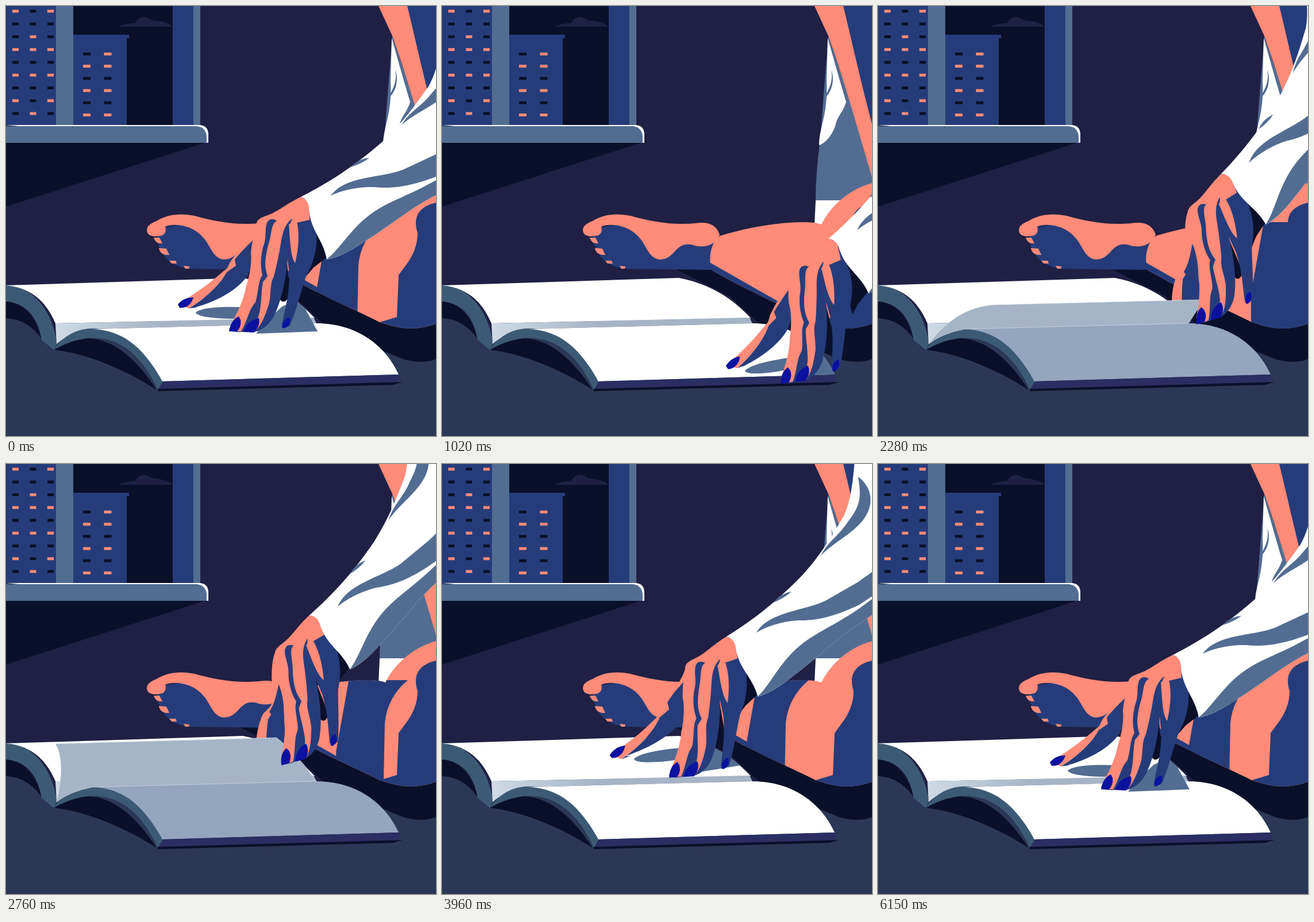
Recreate the animation shown at these times as an HTML page. Size 748 by 748 pixels, loop 6.18 s.

```html
<!DOCTYPE html>
<html lang="en">
<head>
<meta charset="utf-8">
<title>Turning a page</title>
<style>
html, body { margin: 0; height: 100%; overflow: hidden; background: #202044; }
svg { display: block; width: 100%; height: 100%; }
.wall { fill: #202044 } .dark { fill: #0a1029 } .navy { fill: #263c7a }
.slate { fill: #536d92 } .skin { fill: #ff8b78 } .white { fill: #fff }
.nail { fill: #0b12a0 } .cover { fill: #3d5a74 } .floor { fill: #2b3855 }
</style>
</head>
<body>
<svg viewBox="0 0 748 748">
  <defs>
    <path id="legShape" d="M483,400 C530,386 580,376 630,376 Q650,376 660,380 C675,350 705,320 748,308 V553 C715,564 690,564 650,550 C600,525 540,500 470,460 C460,448 462,430 466,420 Q474,408 483,400Z"/>
    <path id="backPage" d="M0,486 L412,473 C465,483 505,508 537,543 L86,552 C70,515 45,490 0,486Z"/>
    <path id="frontPage" d="M150,562 L540,552 C610,552 660,590 683,641 L272,653 C240,595 205,564 150,562Z"/>
    <path id="gutter" d="M86,552 L535,542 540,552 150,562 Q110,568 88,588Z"/>
    <clipPath id="onLeg"><use href="#legShape"/></clipPath>
    <clipPath id="onBook"><use href="#backPage"/><use href="#frontPage"/><use href="#gutter"/></clipPath>
    <linearGradient id="fold"><stop stop-color="#cfdae5"/><stop offset=".4" stop-color="#a5b5c7"/></linearGradient>
  </defs>

  <rect class="wall" width="748" height="748"/>

  <g id="window">
    <path class="dark" d="M0,0 H338 V208 H0Z M0,237 H349 L0,349Z"/>
    <path class="wall" d="M194,36 Q212,29 225,30 C230,15 246,18 254,25 Q278,26 290,36Z"/>
    <path class="navy" d="M0,0 H87 V208 H0Z M117,50 H214 V56 H210 V208 H117Z M290,0 H326 V208 H290Z"/>
    <path class="slate" d="M87,0 H117 V208 H87Z M326,0 H338 V208 H326Z"/>
    <path class="white" d="M0,207 H335 Q351,207 352,222 V238 H340Z"/>
    <path class="slate" d="M0,209 H331 Q347,210 349,226 V238 H0Z"/>
  </g>

  <path class="floor" d="M0,541 Q30,543 60,575 L748,560 V748 H0Z"/>
  <path class="dark" d="M405,457 L470,458 C560,500 650,560 748,553 V614 Q725,624 690,614 L560,560 500,505Z"/>

  <g id="torso">
    <path class="slate" d="M672,52 L748,280 V340 H650 C650,290 656,250 658,230Z"/>
    <path class="white" d="M671,56 C682,95 692,130 703,167 C696,188 690,188 685,205 C680,225 665,240 656,242 C656,210 672,190 669,130Z M650,338 H748 L690,380 H648Z"/>
    <path class="slate" d="M677,112 C682,135 668,150 666,160 C680,148 683,125 677,112Z"/>
    <path class="navy" d="M696,0 H748 V210Z"/>
    <path class="skin" d="M648,0 H698 C715,70 728,130 748,205 V298 C728,230 700,130 672,52Z"/>
  </g>

  <use href="#legShape" class="skin"/>
  <g clip-path="url(#onLeg)">
    <path class="navy" d="M748,342 C715,350 708,370 716,395 Q716,425 694,453 L683,468 680,541 650,550 700,580 H748Z M455,440 L585,514 575,530 455,470Z"/>
    <path id="armShade" class="navy"/>
  </g>

  <g id="foot">
    <path class="navy" d="M276,385 L262,402 Q266,425 277,437 Q290,452 315,457 L470,459 Q460,435 476,405 L400,385 330,376Z"/>
    <path class="skin" d="M245,390 Q245,380 262,374 C280,362 305,360 328,365 C360,374 400,382 440,378 Q475,372 483,398 C475,415 460,421 440,417 C405,405 408,442 378,441 C360,438 357,420 345,405 Q328,384 300,381 Q285,380 277,384 Q280,394 272,399 Q246,405 245,390Z"/>
    <path class="skin" d="M257,403 L267,403 272,413 Q260,414 257,403Z M266,421 L279,422 284,433 Q268,434 266,421Z M284,443 L295,443 297,448 H288Z M309,452 L319,453 318,457 H312Z"/>
  </g>

  <g id="under"></g>

  <g id="book">
    <path class="dark" d="M0,510 Q50,525 62,580 Q40,545 0,543Z M84,598 C120,570 190,555 262,668 C220,640 150,606 84,598Z"/>
    <path class="cover" d="M0,485 C50,486 85,540 88,588 L83,598 62,581 C55,540 35,517 0,514Z"/>
    <use href="#backPage" class="white"/>
    <use href="#gutter" fill="url(#fold)"/>
    <path class="cover" d="M83,598 Q110,558 160,561 C210,566 245,600 273,653 L264,668 C225,580 160,555 83,598Z"/>
    <use href="#frontPage" id="front"/>
    <path fill="#2a2e62" d="M273,653 L683,641 686,650 676,657 264,668Z"/>
    <path class="dark" d="M264,666 L690,654 674,659 264,670Z"/>
  </g>
  <path id="page" stroke="#dbe3ea" stroke-width=".7"/>

  <g clip-path="url(#onBook)"><g id="shade">
    <path id="indexShade" class="slate" d="M330,533 C345,521 400,523 440,525 L420,543 C380,546 332,542 330,533Z"/>
    <path class="slate" d="M435,570 Q455,545 480,523 Q505,510 518,522 L542,566Z"/>
  </g></g>

  <g class="arm">
    <path class="dark" d="M520,345 H530 L552,400 557,438 535,455 522,470Z"/>
  </g>
  <g id="over"></g>
  <g class="hand">
    <path class="dark" d="M488,430 L475,508 Q483,522 493,505Z"/>
    <path class="navy" d="M437,377 C432,400 428,430 432,450 C426,480 420,510 410,535 L388,562 Q390,568 410,567 H432 C448,564 462,550 468,535 C480,510 488,470 490,440 L493,470 C492,510 484,530 480,555 Q485,562 494,556 C505,530 515,490 522,470 C536,445 542,420 540,395 L528,340 513,332Z"/>
    <path class="skin" d="M513,332 C490,343 480,352 468,358 C455,366 440,366 436,377 L440,392 458,372 Q464,369 470,373 L478,374 498,370 492,384 506,377 528,372 527,340Z"/>
    <path class="skin" d="M436,377 L456,372 C448,390 455,400 447,420 C442,440 443,455 446,468 C438,480 440,495 434,515 L427,525 C420,540 416,555 409,566 H400 L409,545 390,556 C402,535 414,510 417,490 C424,470 428,445 426,430 C428,405 434,390 436,377Z"/>
    <path class="skin" d="M466,378 C475,368 485,368 497,370 C480,385 480,405 476,425 C472,445 470,455 466,470 C458,485 462,500 457,520 C450,540 445,555 432,567 L437,545 C445,530 443,500 447,480 L455,470 C448,450 452,435 455,420 C462,400 460,390 466,378Z"/>
    <path class="skin" d="M492,380 L505,372 C512,395 508,425 503,447 C494,435 494,400 492,380Z"/>
    <path class="nail" d="M388,566 Q391,546 405,540 Q413,553 402,566Z M413,567 Q420,546 440,543 Q443,557 431,568Z M480,559 Q482,543 494,542 Q496,557 483,561Z"/>
  </g>
  <g class="arm">
    <path class="white" d="M513,332 C560,308 605,280 656,235 C690,203 710,175 735,140 C752,110 757,70 765,30 L785,-160 1000,-160 960,200 748,329 C705,350 665,385 620,412 Q585,436 558,441 C552,405 528,390 527,350 Q525,336 513,332Z"/>
    <path class="slate" d="M557,441 C580,425 600,385 640,358 C670,338 700,330 748,303 L960,175 V200 L748,329 C705,350 665,385 620,412 Q585,436 557,441Z"/>
    <path class="slate" d="M565,330 C590,295 650,300 690,285 L748,258 900,170 V215 L748,297 C700,315 670,318 640,315 C610,314 580,322 565,330Z"/>
    <path class="slate" d="M600,280 Q612,266 632,264 Q620,274 600,280Z M688,207 C705,180 720,178 742,150 C765,125 768,110 765,75 C788,95 790,125 768,150 C745,175 712,185 688,207Z"/>
  </g>

  <g id="index" class="hand">
    <path class="navy"/><path class="skin"/><path class="nail"/>
  </g>
</svg>

<script>
const $ = s => document.querySelector(s);
const LOOP = 6180;

// Lit windows, one digit per pane
function panes(rows, x, y, dx, dy, w) {
  rows.forEach((row, j) => [...row].forEach((lit, i) => {
    const r = document.createElementNS('http://www.w3.org/2000/svg', 'rect');
    const box = { x: x + i * dx, y: y + j * dy, width: w, height: 5, class: +lit ? 'skin' : 'dark' };
    for (const k in box) r.setAttribute(k, box[k]);
    $('#window').append(r);
  }));
}
panes(['101', '000', '010', '111', '000', '111', '000', '101', '010'], 11, 6.5, 30.5, 22.25, 11);
panes(['01', '11', '00', '11', '00', '11'], 134, 81, 36.5, 21.2, 13);

// time, wrist x, wrist y, hand angle, sleeve angle, lift, arm shade left, right, page turn
const keys = [
  [0, 513, 332, 0, 0, 0, 545, 613, 0],
  [120, 513, 332, 0, 0, 0, 545, 613, 0],
  [1020, 672, 405, -10, -14, 0, 705, 800, 0],
  [1200, 674, 404, -11, -14, 0, 707, 800, 0],
  [1500, 670, 380, -14, -16, 1, 700, 800, .1],
  [2280, 597, 292, -19, -19, 1.15, 655, 760, .5],
  [3210, 487, 251, -15, -9, 1, 530, 585, 1],
  [3960, 495, 300, -6, -5, -.2, 533, 598, 1],
  [4620, 513, 332, 0, 0, 0, 545, 613, 1],
  [LOOP, 513, 332, 0, 0, 0, 545, 613, 1]
];

// Monotone cubic through the keys
function slope(i, c) {
  if (i < 1 || i > keys.length - 2) return 0;
  const d = j => (keys[j + 1][c] - keys[j][c]) / (keys[j + 1][0] - keys[j][0]);
  const a = d(i - 1), b = d(i);
  return a * b > 0 ? 2 * a * b / (a + b) : 0;
}
function pose(t) {
  let i = 0;
  while (i < keys.length - 2 && t >= keys[i + 1][0]) i++;
  const a = keys[i], b = keys[i + 1], h = b[0] - a[0], u = (t - a[0]) / h, v = 1 - u;
  return a.slice(1).map((p, n) => {
    const c = n + 1;
    return v * v * (1 + 2 * u) * p + u * u * (3 - 2 * u) * b[c]
      + h * u * v * (v * slope(i, c) - u * slope(i + 1, c));
  });
}

// Weighted sum of paths that share one structure
function blend(paths, weights) {
  const nums = paths.map(p => p.match(/-?[\d.]+/g));
  let n = 0;
  return paths[0].replace(/-?[\d.]+/g, () => {
    const sum = nums.reduce((s, list, i) => s + list[n] * weights[i], 0);
    n++;
    return sum.toFixed(2);
  });
}

// Index finger: flat, lifted
const finger = [
  ['M440,395 C430,408 415,420 398,441 L400,452 L384,463 C372,485 345,510 318,526 C345,522 330,526 330,524 C365,514 400,496 418,472 C432,448 436,430 442,400Z',
   'M436,405 C425,430 412,455 396,468 L398,474 L390,480 C384,490 375,512 364,532 C375,540 385,542 393,542 C400,530 414,500 420,478 C430,450 436,430 442,400Z'],
  ['M437,376 C428,400 405,425 393,441 C386,450 388,455 380,460 C365,472 345,492 299,518 L318,526 C345,510 372,485 384,463 L400,452 L398,441 C415,420 430,408 440,395Z',
   'M436,376 C420,400 414,430 404,455 C401,462 390,466 384,470 C370,485 358,505 348,528 L364,532 C375,512 384,490 390,480 L398,474 L396,468 C412,455 425,430 436,411Z'],
  ['M299,519 Q310,506 326,507 Q320,526 302,525Z',
   'M348,534 Q352,528 366,530 Q362,542 350,542Z']
];
// Page: front, upright, back
const sheet = [
  'M88,588 Q150,530 272,653 L683,640 Q625,560 540,552 L150,562 Q110,570 88,588Z',
  'M88,588 Q135,525 200,520 L565,511 Q552,535 540,552 L150,562 Q110,570 88,588Z',
  'M88,588 Q80,510 0,486 L412,473 Q480,480 540,552 L150,562 Q110,570 88,588Z'
];
const tint = (rgb, k) => `rgb(${rgb.map(c => 255 + (c - 255) * k)})`;

function draw(t) {
  const [x, y, turn, sleeve, lift, left, right, p] = pose(t);
  const place = (el, angle, dx = 0, dy = 0) => el.setAttribute('transform',
    `translate(${x + dx} ${y + dy}) rotate(${angle}) translate(-513 -332)`);
  document.querySelectorAll('.hand').forEach(el => place(el, turn));
  document.querySelectorAll('.arm').forEach(el => place(el, sleeve));

  [...$('#index').children].forEach((el, i) =>
    el.setAttribute('d', blend(finger[i], [1 - lift, lift])));
  const layer = $(lift > .5 ? '#under' : '#over');
  if ($('#index').parentNode !== layer) layer.append($('#index'));

  $('#armShade').setAttribute('d',
    `M${left + 16},376 L${left - 6},500 V600 H${right - 3} L${right},450 Q${right + 5},405 ${right + 40},376Z`);

  const flying = p > .001 && p < .999;
  const gray = Math.min(1, 2 * Math.sin(Math.PI * p));
  $('#front').setAttribute('fill', tint([148, 165, 190], gray));
  $('#page').style.display = flying ? '' : 'none';
  $('#page').setAttribute('fill', tint([165, 181, 199], gray));
  $('#page').setAttribute('d', blend(sheet, [(1 - p) * (1 - 2 * p), 4 * p * (1 - p), p * (2 * p - 1)]));

  // The shadow drops away from the raised hand
  place($('#shade'), turn * (1 - lift), 24 * lift, 46 * lift);
  $('#shade').style.display = flying ? 'none' : '';
  $('#indexShade').style.opacity = 1 - lift;
}

const start = performance.now();
(function frame() {
  draw((performance.now() - start) % LOOP);
  requestAnimationFrame(frame);
})();
</script>
</body>
</html>
```
